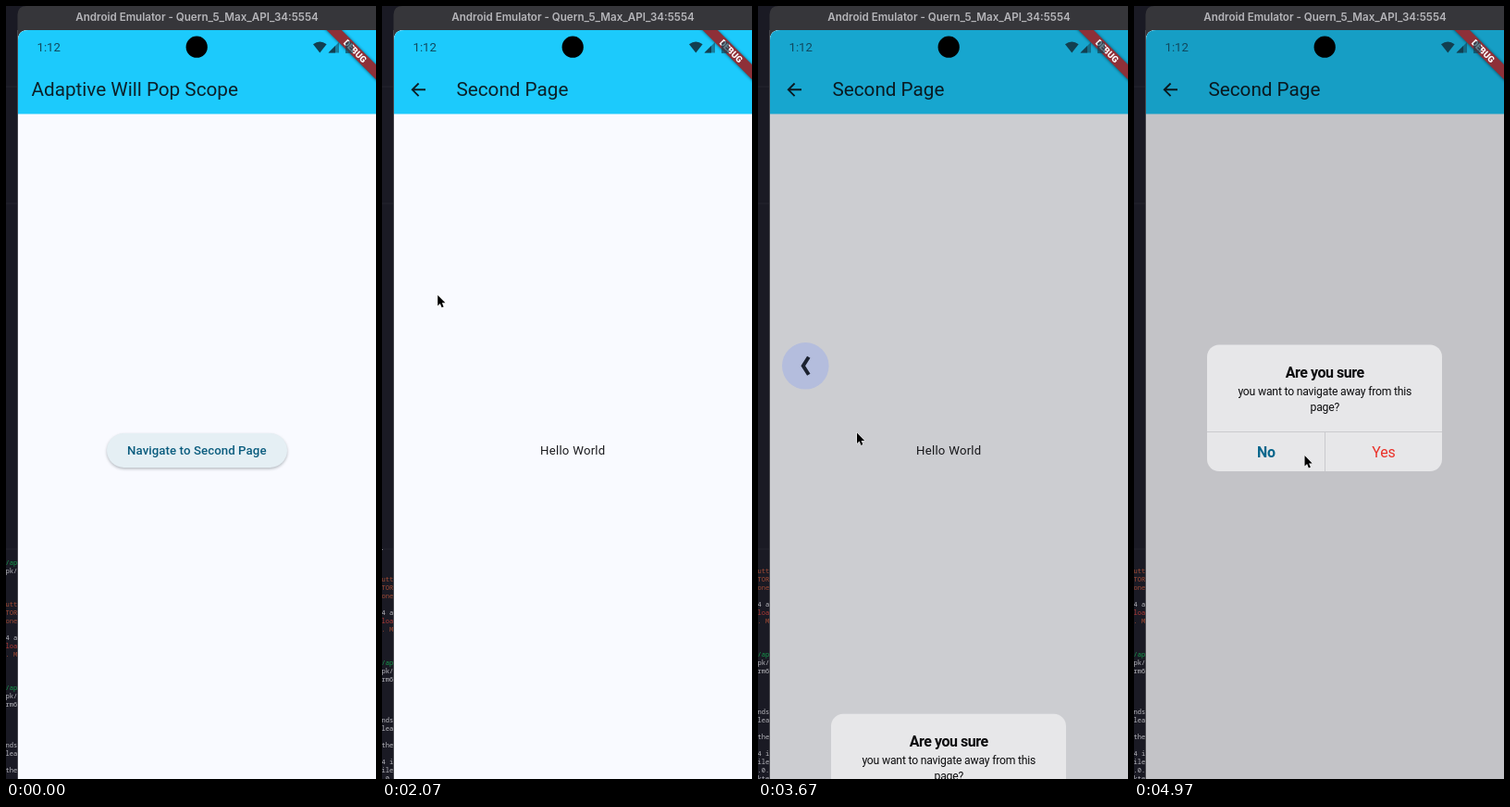
An HTML page that plays this animation: 400x834 px, repeating every 5010 ms.

```html
<!DOCTYPE html>
<html lang="en">
<head>
<meta charset="utf-8">
<title>Adaptive Will Pop Scope</title>
<style>
  html, body { margin: 0; width: 100%; height: 100%; overflow: hidden; background: #1a1a24; }
  svg { display: block; width: 400px; height: 834px; font-family: Roboto, sans-serif; }
  .mid { text-anchor: middle; }
  .page { fill: #f9faff; }
  .bar { fill: #1ccafc; }
  .head { font-size: 20.7px; fill: #0c2029; }
  .body { font-size: 13.2px; letter-spacing: .24px; fill: #1c1c20; }
  .log { font: 7.1px "Noto Sans Mono", monospace; }
  .note { font-size: 12.2px; letter-spacing: -.2px; }
  .action { font-size: 15.9px; }
  .bold { font-weight: 600; }
</style>
</head>
<body>
<svg viewBox="0 0 400 834">
  <defs>
    <clipPath id="screen"><path d="M13 834V37Q13 26 24 26H400V834Z"/></clipPath>
    <clipPath id="panel"><rect y="586" width="12" height="248"/></clipPath>
    <filter id="soft" x="-20%" y="-100%" width="140%" height="300%"><feGaussianBlur stdDeviation="1.4"/></filter>
  </defs>

  <rect width="400" height="834" fill="#1a1a24"/>
  <path d="M0 87H12M0 213H12M0 586H12" stroke="#25252f"/>
  <g clip-path="url(#panel)"><g id="log" class="log"></g></g>
  <path d="M12.5 834V9Q13 0 22 0H400V40H13" fill="#36363a"/>
  <path d="M12.5 834V26" stroke="#46464c"/>
  <text class="mid" x="206.5" y="16.3" fill="#b6b6ba" style="font:600 11.6px Inter,sans-serif">Android Emulator - Quern_5_Max_API_34:5554</text>

  <g clip-path="url(#screen)">
    <rect class="page" x="13" y="26" width="387" height="808"/>
    <g id="first">
      <rect class="page" x="13" y="26" width="387" height="834"/>
      <rect class="bar" x="13" y="26" width="387" height="90.5"/>
      <text class="head" x="27.5" y="97">Adaptive Will Pop Scope</text>
      <rect x="109" y="462.5" width="195" height="37" rx="18.5" fill="#707880" opacity=".5" filter="url(#soft)"/>
      <rect id="button" x="109" y="461" width="195" height="37" rx="18.5"/>
      <circle id="ripple" cx="211" cy="487" fill="#00658a"/>
      <text class="mid" x="206.3" y="484.3" font-size="13.2" font-weight="500" letter-spacing=".1" fill="#0a5c7e">Navigate to Second Page</text>
    </g>
    <g id="second">
      <rect class="page" x="13" y="26" width="387" height="834"/>
      <rect class="bar" x="13" y="26" width="387" height="90.5"/>
      <path d="M47 90.3H33M39.6 83.5L32.8 90.3L39.6 97.1" fill="none" stroke="#0c2029" stroke-width="1.9"/>
      <text class="head" x="80.5" y="97">Second Page</text>
      <text class="body mid" x="206.3" y="484.3">Hello World</text>
    </g>
    <rect id="dim" x="13" y="26" width="387" height="808"/>

    <g id="dialog">
      <rect x="79" y="365.5" width="254" height="136.5" rx="13" fill="#e7e7e9"/>
      <path d="M79 459.5H333M206.5 459.5V502" stroke="#cacace"/>
      <g class="mid" fill="#0c0c0e">
        <text class="bold" x="206.2" y="401" font-size="16" letter-spacing="-.47">Are you sure</text>
        <text class="note" x="206.3" y="420">you want to navigate away from this</text>
        <text class="note" x="206.3" y="437">page?</text>
        <text class="action bold" x="143" y="487" fill="#08668c">No</text>
        <text class="action" x="270" y="487" fill="#ea3028">Yes</text>
      </g>
    </g>

    <g transform="translate(400 26) rotate(45)">
      <rect x="-60" y="26.3" width="120" height="11.8" opacity=".5" filter="url(#soft)"/>
      <rect x="-60" y="26.3" width="120" height="11.4" fill="#8e3038"/>
      <text class="mid" y="35.4" font-size="9.6" font-weight="900" fill="#fff">DEBUG</text>
    </g>

    <text x="33.5" y="49.3" font-size="13.2" fill="#10485e">1:12</text>
    <g fill="#123f50">
      <path d="M332 41.3Q339.3 35.6 346.6 41.3L339.3 50.5Z"/>
      <path d="M348.5 50.5L360 39V50.5Z" opacity=".55"/>
      <path d="M348.5 50.5L356 43V50.5Z"/>
      <path d="M367 39.5H369.3V38H372.7V39.5H375V51H367Z" opacity=".65"/>
    </g>
    <circle cx="206.2" cy="44.2" r="11.6"/>

    <g id="back">
      <circle r="25.3" fill="#b4bddd"/>
      <path d="M3.5 -9.5L-2.5 0L3.5 9.5" fill="none" stroke="#1c2230" stroke-width="4"/>
    </g>
  </g>
  <path id="cursor" d="M0 0V11.6L2.6 9.1L4.4 13.4L6.4 12.5L4.6 8.4H8.2Z" stroke="#fff" stroke-width="1" paint-order="stroke"/>
</svg>

<script>
const LOOP = 5010;
const $ = id => document.getElementById(id);
const set = (id, attrs) => {
  for (const key in attrs) $(id).setAttribute(key, attrs[key]);
};
const span = (t, a, b) => Math.min(1, Math.max(0, (t - a) / (b - a)));
const smooth = p => p * p * (3 - 2 * p);
const easeOut = p => 1 - (1 - p) ** 3;

// Visible ends of log lines: y, text, colour
const green = '#169a4c', pale = '#b8b8be', orange = '#a04a34', red = '#b03a36';
const lines = [
  [603, '/ap', green], [612, 'pk/', pale],
  [648, 'utt', orange], [657, 'TOR', orange], [666, 'one', orange],
  [684, '4 a', pale], [693, 'loa', red], [702, '. M', orange],
  [738, '/ap', green], [747, 'pk/', pale], [756, 'rm6', pale],
  [800, 'nds', pale], [809, 'lea', pale], [827, 'the', pale],
  [845, '4 i', pale], [854, 'ile', pale], [863, '.0.', pale], [872, 'kte', pale]
];
for (const [y, text, fill] of lines) {
  const node = document.createElementNS('http://www.w3.org/2000/svg', 'text');
  node.textContent = text;
  $('log').append(node);
  node.setAttribute('x', -.5);
  node.setAttribute('y', y);
  node.setAttribute('fill', fill);
}

// Pointer stops: time, x, y
const stops = [
  [350, 196, 836], [800, 210.5, 487.5], [1120, 210.5, 487.5], [1470, 85, 188],
  [1750, 85, 188], [2400, 34.5, 440.5], [3100, 34.5, 440.5], [3250, 16, 440],
  [3560, 107, 460.5], [3680, 107, 460.5], [3900, 128, 463.5], [4150, 128, 463.5],
  [4850, 183.5, 484.5], [4970, 184.5, 485]
];
function pointer(t) {
  const next = stops.findIndex(stop => stop[0] > t);
  if (next === 0) return stops[0].slice(1);
  if (next < 0) return stops.at(-1).slice(1);
  const [t0, x0, y0] = stops[next - 1], [t1, x1, y1] = stops[next];
  const p = smooth(span(t, t0, t1));
  return [x0 + (x1 - x0) * p, y0 + (y1 - y0) * p];
}

const zoom = s => `translate(206.5 433) scale(${s}) translate(-206.5 -433)`;

function draw(t) {
  const scroll = t < 560 ? 0 : t < 1100 ? 9 : t < 3520 ? 27 : 36;
  set('log', { transform: `translate(0 ${-scroll})` });
  set('cursor', { transform: `translate(${pointer(t)})` });

  const hover = t > 760 && t < 1200;
  set('button', { fill: hover ? '#d8e8ef' : '#e5eff4' });
  const tap = span(t, 1000, 1250);
  set('ripple', { r: 18 * easeOut(tap), opacity: tap > 0 ? .12 * (1 - tap) : 0 });

  const page = easeOut(span(t, 1070, 1370));
  set('first', { transform: zoom(1 + .05 * page) });
  set('second', { transform: zoom(.85 + .15 * page), opacity: span(t, 1085, 1150) });

  const open = span(t, 3520, 3820);
  set('dim', { opacity: .22 * (1 - (1 - open) ** 2.4) });
  set('dialog', { transform: `translate(0 ${802 * (1 - open)})` });

  const pull = easeOut(span(t, 3270, 3480));
  set('back', {
    transform: `translate(${-15 + 66.3 * pull} 388.3)`,
    opacity: span(t, 3270, 3310) * (1 - span(t, 3680, 3790))
  });
}

const start = performance.now();
function frame() {
  draw((performance.now() - start) % LOOP);
  requestAnimationFrame(frame);
}
frame();
</script>
</body>
</html>
```
